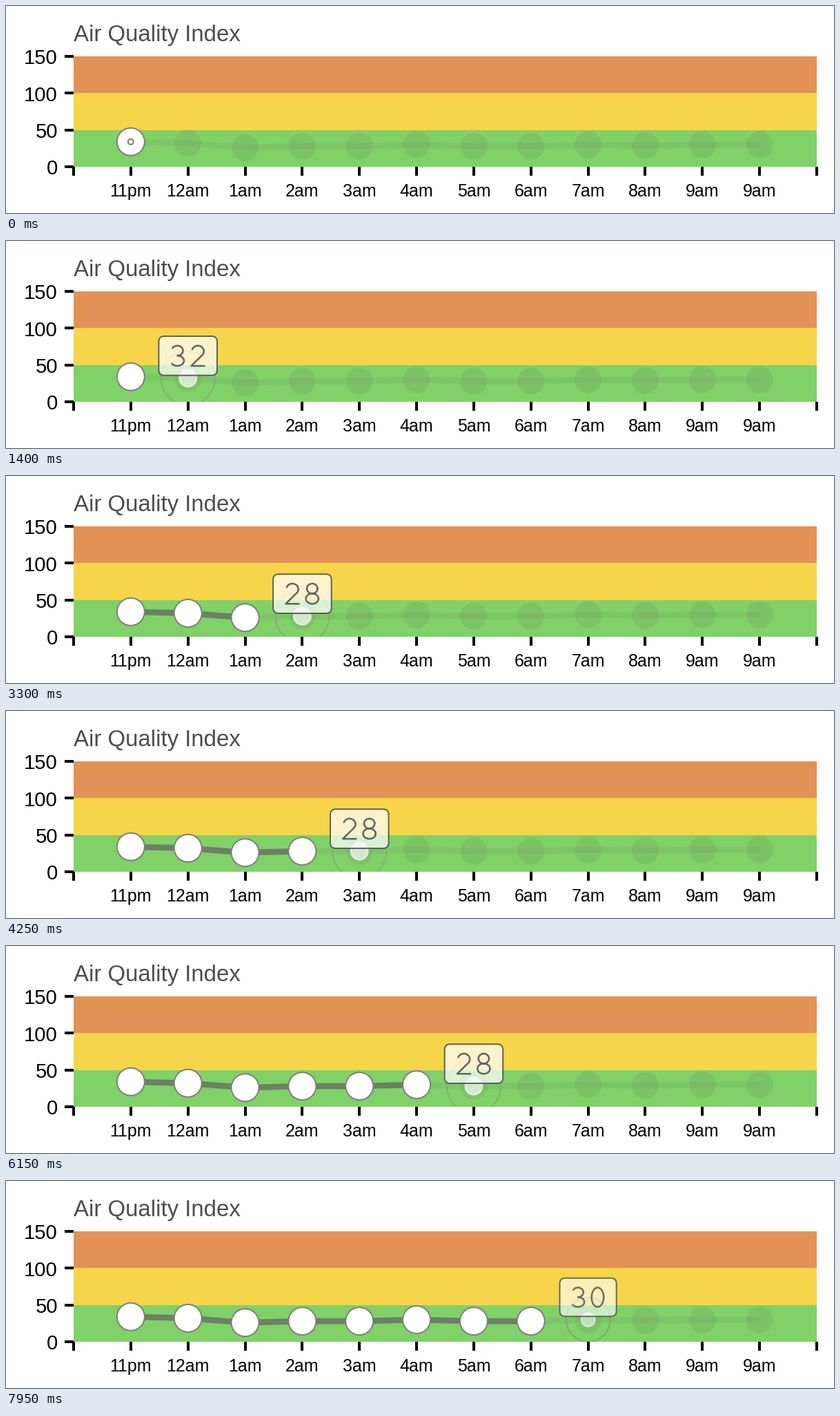
Animation, 1200 px wide and 300 px high, one loop 8000 ms. Source, as a matplotlib script:

```python
import numpy as np
import matplotlib.pyplot as plt
from matplotlib.animation import FuncAnimation
from matplotlib.patches import Circle, FancyBboxPatch, Rectangle

W, H, DPI = 1200, 300, 100
PT = 72 / DPI
FRAMES, STEP = 160, 50
CYCLE, GROW = 19, 15  # frames per reading, frames of growth

LEFT, RIGHT, TOP, BOTTOM = 98, 1175, 73, 233
HOURS = ["11pm", "12am"] + [f"{h}am" for h in (1, 2, 3, 4, 5, 6, 7, 8, 9, 9)]
AQI = np.array([34, 32, 26, 28, 28, 30, 28, 28, 30, 29, 30, 30])
XS = LEFT + (RIGHT - LEFT) / 13 * np.arange(1, 13)


def y_of(value):
    return BOTTOM - value * (BOTTOM - TOP) / 150


YS = y_of(AQI)

plt.rcParams["font.family"] = "Liberation Sans"
fig = plt.figure(figsize=(W / DPI, H / DPI), dpi=DPI, facecolor="white")
ax = fig.add_axes([0, 0, 1, 1])
ax.set_xlim(0, W)
ax.set_ylim(H, 0)
ax.axis("off")


def stroke(x, y, color, width, z, **kw):
    return ax.plot(x, y, color=color, lw=width * PT, zorder=z,
                   solid_capstyle="butt", **kw)[0]


def text(x, y, s, size, ha, color="black"):
    ax.text(x, y, s, fontsize=size * PT, ha=ha, va="baseline", color=color)


def disc(x, y, r, z, **kw):
    return ax.add_patch(Circle((x, y), r, zorder=z, **kw))


# Bands, axes and captions
for low, color in ((0, "#80D168"), (50, "#F6D54A"), (100, "#E39255")):
    top = y_of(low + 50)
    ax.add_patch(Rectangle((LEFT, top), RIGHT - LEFT, y_of(low) - top,
                           fc=color, lw=0, zorder=1))
for v in (0, 50, 100, 150):
    stroke([85, LEFT], [y_of(v)] * 2, "black", 4, 1)
    text(75, y_of(v) + 11.3, str(v), 29.3, "right")
for x in (LEFT, *XS, RIGHT):
    stroke([x, x], [BOTTOM, 246], "black", 4, 1)
for x, hour in zip(XS, HOURS):
    text(x, 276, hour, 25, "center")
text(98, 51, "Air Quality Index", 33, "left", "#4D4D4D")

# Faint preview of the whole series
stroke(XS, YS, "#666666", 9, 2, alpha=0.1)
for x, y in zip(XS, YS):
    disc(x, y, 19.5, 2, fc="#666666", lw=0, alpha=0.12)

# Readings already passed
trail = stroke([], [], "#6C8065", 8.5, 3)
marks = [disc(x, y, 20, 4, fc="white", ec="#7F7F7F", lw=2 * PT)
         for x, y in zip(XS, YS)]

# The current reading
panel = Rectangle((LEFT, TOP), RIGHT - LEFT, BOTTOM - TOP,
                  transform=ax.transData)
ring = disc(0, 0, 4, 5, fill=False, ec="#7F7F7F", lw=2 * PT)
ring.set_clip_path(panel)
dot = disc(0, 0, 1, 6, lw=2 * PT)
box = ax.add_patch(FancyBboxPatch((0, 0), 80, 50, lw=2 * PT, zorder=7,
                                  boxstyle="round,pad=0,rounding_size=8"))
digits = ax.plot([], [], lw=2.5 * PT, zorder=8, solid_capstyle="round",
                 solid_joinstyle="round")[0]


def arc(cx, cy, rx, ry, a0=0, a1=360):
    a = np.radians(np.linspace(a0, a1, 40))
    return np.column_stack([cx + rx * np.cos(a), cy + ry * np.sin(a)])


GAP = np.array([[np.nan, np.nan]])

# Thin monospaced numerals in em units, baseline at 0
GLYPHS = {
    "0": arc(0, 0.305, 0.19, 0.305),
    "2": np.vstack([arc(0, 0.44, 0.18, 0.17, 160, -35),
                    [(-0.2, 0), (0.2, 0)]]),
    "3": np.vstack([arc(-0.02, 0.46, 0.17, 0.15, 150, -90),
                    arc(-0.02, 0.155, 0.2, 0.155, 90, -145)]),
    "4": np.vstack([[(0.08, 0), (0.08, 0.61), (-0.18, 0.18), (0.18, 0.18)],
                    GAP, [(-0.02, 0), (0.16, 0)]]),
    "6": np.vstack([arc(0.19, 0.19, 0.36, 0.42, 90, 180),
                    arc(0.01, 0.19, 0.18, 0.19, 180, 540)]),
    "8": np.vstack([arc(0, 0.46, 0.16, 0.15), GAP,
                    arc(0, 0.155, 0.19, 0.155)]),
}


def numeral(value, cx, cy, em):
    parts = []
    for i, c in enumerate(str(value)):
        parts += [GLYPHS[c] + [0.6 * i - 0.3, 0], GAP]
    p = np.vstack(parts)
    return cx + em * p[:, 0], cy + em * (0.305 - p[:, 1])


def draw(n):
    k, phase = divmod(n + 1, CYCLE)
    f = min(1, phase / GROW) if k else min(1, n / (GROW - 1))
    x, y = XS[k], YS[k]

    past = max(k, 1)
    trail.set_data(XS[:past], YS[:past])
    for i, m in enumerate(marks):
        m.set_visible(i < past)

    ring.center = dot.center = (x, y)
    ring.set_radius(4 + 52.5 * f)
    ring.set_alpha(1 - f)
    dot.set_radius(18.7 * f)
    dot.set_facecolor((1, 1, 1, f))
    dot.set_edgecolor((1, 1, 1, f))

    em = 38 + 15 * f
    w, h = 1.2 * em + 27, 0.62 * em + 27
    cy = y - 32.5
    ink = (0.3, 0.3, 0.3, f ** 0.35)
    box.set_bounds(x - w / 2, cy - h / 2, w, h)
    box.set_facecolor((1, 1, 1, f ** 0.8))
    box.set_edgecolor(ink)
    digits.set_data(*numeral(AQI[k], x, cy, em))
    digits.set_color(ink)

    for a in (dot, box, digits):
        a.set_visible(f > 0)
    return [trail, *marks, ring, dot, box, digits]


anim = FuncAnimation(fig, draw, frames=FRAMES, interval=STEP,
                     repeat=True, repeat_delay=0, blit=False)
plt.show()
```
